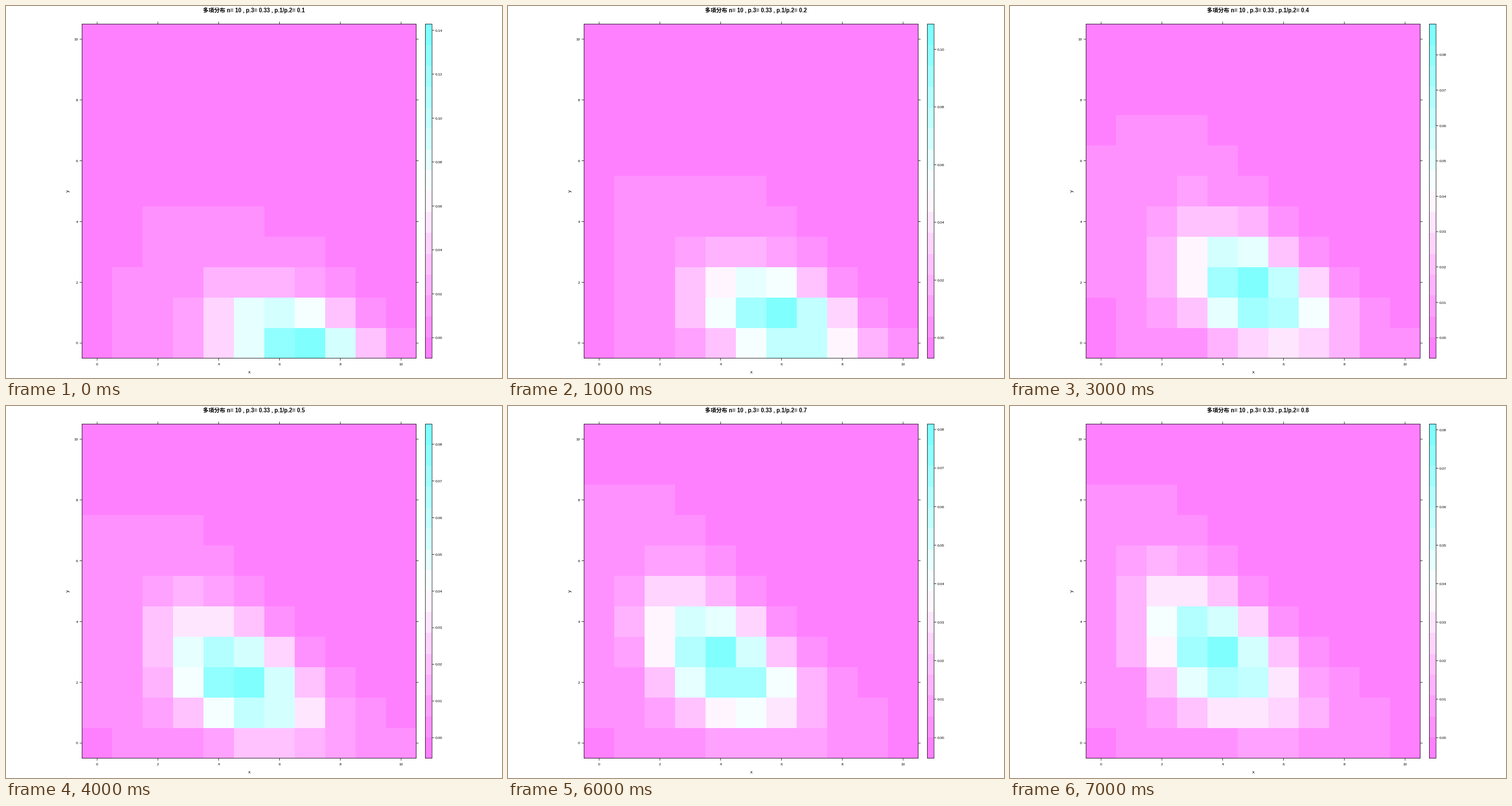
A matplotlib script that plays this animation: 864 by 648 pixels, repeating every 8 s.

```python
import math

import matplotlib.pyplot as plt
import numpy as np
from matplotlib.animation import FuncAnimation
from matplotlib.colors import ListedColormap
from matplotlib.patches import Rectangle

W, H = 864, 648
N = 10
P3 = 1 / 3
LEVELS = 16
LEFT, RIGHT, TOP, BOTTOM = 132.4, 714.6, 31.4, 613.6
KEY_L, KEY_R = 730.5, 742.1
TICK = 4
CELL = (RIGHT - LEFT) / (N + 1)
LINE = dict(color="black", lw=0.75, solid_capstyle="butt", snap=False)

plt.rcParams["font.family"] = ["Liberation Sans", "Noto Sans CJK JP"]


def palette():
    """Magenta through near-white to cyan, one colour per level."""
    colors = []
    for i in range(LEVELS):
        k = round(i * 99 / (LEVELS - 1))
        if k < 50:
            colors.append((1, 0.5 + 0.01 * k, 1))
        else:
            colors.append((1 - 0.01 * (k - 49), 1, 1))
    return ListedColormap(colors)


def multinomial(ratio):
    """Probability of (x, y, N - x - y), indexed [y, x]."""
    px = (1 - P3) / (1 + ratio)
    py = px * ratio
    z = np.zeros((N + 1, N + 1))
    for y in range(N + 1):
        for x in range(N + 1 - y):
            rest = N - x - y
            ways = math.comb(N, x) * math.comb(N - x, y)
            z[y, x] = ways * px**x * py**y * P3**rest
    return z


CMAP = palette()

fig = plt.figure(figsize=(W / 72, H / 72), dpi=72, facecolor="white")
ax = fig.add_axes([0, 0, 1, 1])
ax.axis("off")


def mesh(levels, left, right):
    """Grid of flat cells, bottom row first, with edges on whole pixels."""
    rows, cols = levels.shape
    xs = np.round(np.linspace(left, right, cols + 1))
    ys = np.round(np.linspace(BOTTOM, TOP, rows + 1))
    return ax.pcolormesh(xs, ys, levels, cmap=CMAP, vmin=-0.5,
                         vmax=LEVELS - 0.5, antialiased=False, zorder=1)


def segment(x0, y0, x1, y1):
    return ax.plot([x0, x1], [y0, y1], **LINE)[0]


def frame(left, right):
    ax.add_patch(Rectangle((left, TOP), right - left, BOTTOM - TOP,
                           fill=False, ec="black", lw=0.75, snap=False,
                           zorder=3))


def label(x, y, s, size=6.4, va="baseline", **kw):
    return ax.text(x, y, s, fontsize=size, color="black", va=va, **kw)


heat = mesh(np.zeros((N + 1, N + 1)), LEFT, RIGHT)
mesh(np.arange(LEVELS)[:, None], KEY_L, KEY_R)
frame(LEFT, RIGHT)
frame(KEY_L, KEY_R)

for v in range(0, N + 1, 2):
    x = LEFT + (v + 0.5) * CELL
    y = BOTTOM - (v + 0.5) * CELL
    segment(x, BOTTOM, x, BOTTOM + TICK)
    segment(x, TOP - TICK, x, TOP)
    segment(LEFT - TICK, y, LEFT, y)
    segment(RIGHT, y, RIGHT + TICK, y)
    label(x, 626, str(v), ha="center")
    label(125.6, y + 2.3, str(v), ha="right")

label(423.5, 639.6, "x", 8, ha="center")
label(108, 322.4, "y", 8, ha="center", va="center", rotation=90)
title = label(432, 11.4, "", 9.75, ha="center", weight="bold")

key_ticks = [(segment(KEY_R, 0, KEY_R + TICK, 0),
              label(747.8, 0, "", ha="left"))
             for _ in range(10)]

ax.set_xlim(0, W)
ax.set_ylim(H, 0)


def update(i):
    ratio = (i + 1) / 10
    z = multinomial(ratio)
    peak = z.max()
    low, span = -0.07 * peak, 1.14 * peak

    heat.set_array(np.floor((z - low) / span * LEVELS))
    title.set_text(f"多項分布 n= {N} , p.3= {P3:.2f} , p.1/p.2= {ratio:.1f}")

    step = 0.02 if low + span > 0.09 else 0.01
    for k, (mark, text) in enumerate(key_ticks):
        v = k * step
        shown = v < low + span
        y = BOTTOM - (v - low) / span * (BOTTOM - TOP)
        mark.set_ydata([y, y])
        text.set_y(y + 2.3)
        text.set_text(f"{v:.2f}")
        mark.set_visible(shown)
        text.set_visible(shown)
    return []


anim = FuncAnimation(fig, update, frames=8, interval=1000, repeat=True,
                     repeat_delay=0, blit=False)
plt.show()
```
